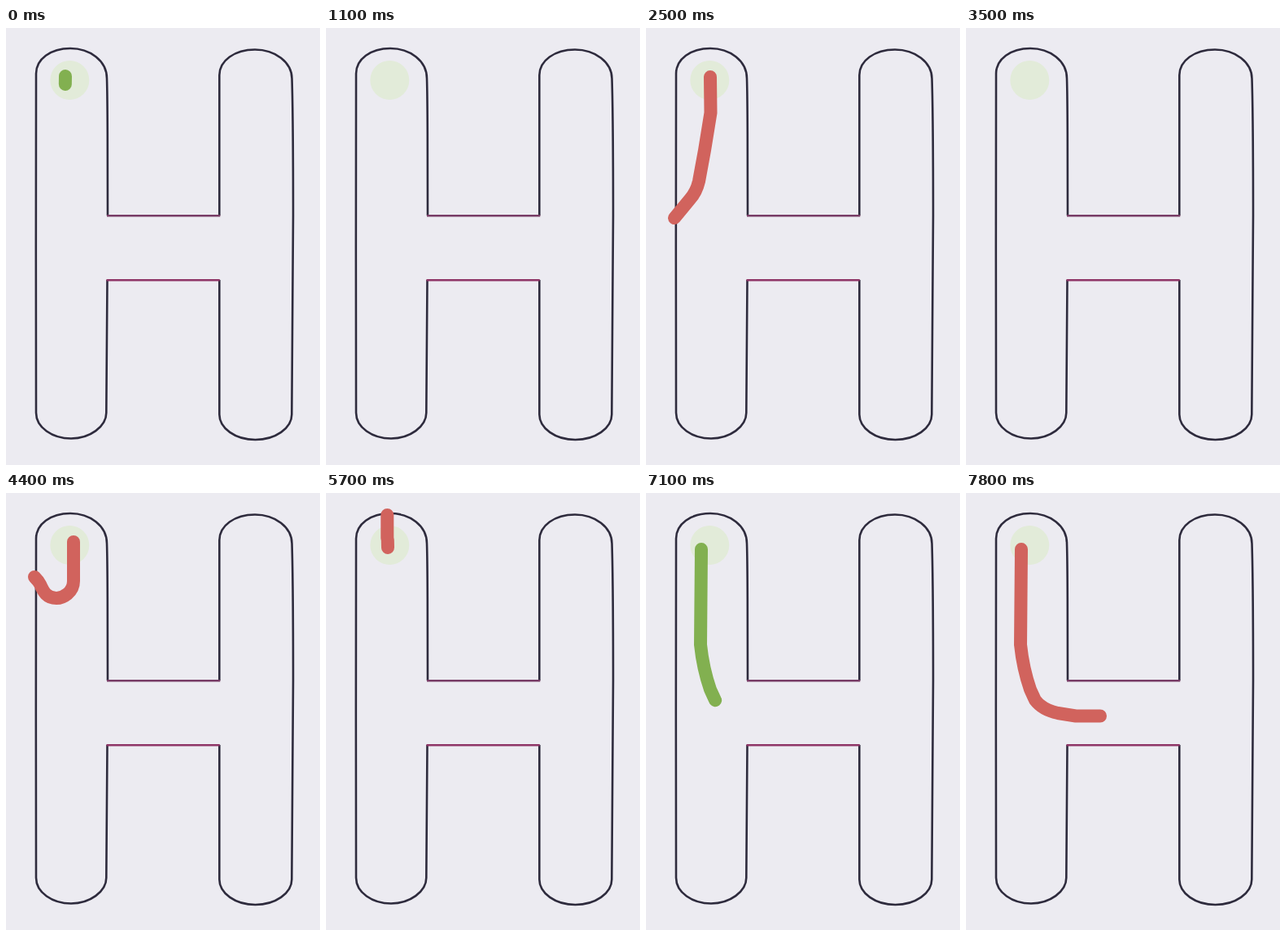
An HTML page for the animation above (7900 ms loop, 386 px wide and 536 px high).

```html
<!DOCTYPE html>
<html lang="en">
<head>
<meta charset="utf-8">
<title>Letter tracing</title>
<style>
  html, body { margin: 0; width: 100%; height: 100%; overflow: hidden; background: #ecebf1; }
  svg { display: block; width: 386px; height: 536px; }
  path { fill: none; }
  .edge { stroke: #2e2b3d; stroke-width: 2.6; stroke-linejoin: round; }
  #trace { stroke-width: 16; stroke-linecap: round; stroke-linejoin: round; }
</style>
</head>
<body>
<svg viewBox="0 0 386 536">
  <circle cx="78.3" cy="64" r="24" fill="#e2ebd9"/>
  <path class="edge" d="M125 230 L124.8 130 Q124.6 80 124 62 C124 40 103 25 79 25 S37 38 37 56 L36.8 270 L37 472 C37 490 57 503.500 80 503.500 S123.300 489 123.300 472 L124.500 309"/>
  <path class="edge" d="M262.300 230 L262.300 58 C262.300 40 281 26.500 306 26.500 S351.300 42 351.500 62 Q353 110 353 230 Q352.800 330 351.300 474 C351.300 491 331 505 306.500 505 S262.300 491 262.300 474 L262.300 309"/>
  <path d="M124 230.200 H263.300" stroke="#783c66" stroke-width="2.5"/>
  <path d="M123.500 309.200 H262.800" stroke="#8f3567" stroke-width="2.5"/>
  <path id="trace"/>
</svg>
<script>
  const LOOP = 7900, STEP = 100;
  const GREEN = '#82b050', RED = '#d1635d';

  // keys: [time, drawn length]; the stroke turns red at `fail` and vanishes at `end`
  const strokes = [
    { d: 'M73 59 L72 120 Q72 165 75 195',
      keys: [[0, 10], [500, 137]], fail: 500, end: 1000 },
    { d: 'M79 60 L79.5 104 L72 150 L65 188 Q62 201 54 210 L35 233',
      keys: [[1700, 4], [2400, 174], [2500, 200]], fail: 2500, end: 3000 },
    { d: 'M83 60 V108 C83 122 70 129 62 129 C50 129 46 121 42 112 Q40 108 35 103',
      keys: [[3600, 2], [4400, 140]], fail: 4400, end: 4900 },
    { d: 'M76 67 L75.8 58 L75.3 55 V27',
      keys: [[5200, 2], [5500, 42]], fail: 5500, end: 6000 },
    { d: 'M68 69 L67 186 Q70 215 79 241 L85 254 Q94 266 113 270 L135 273.5 H165',
      keys: [[6500, 4], [7100, 188], [7400, 290]], fail: 7400, end: LOOP }
  ];

  const trace = document.getElementById('trace');

  function lengthAt(keys, t) {
    for (let i = 1; i < keys.length; i++) {
      const [t0, a] = keys[i - 1], [t1, b] = keys[i];
      if (t <= t1) return a + (b - a) * (t - t0) / (t1 - t0);
    }
    return keys[keys.length - 1][1];
  }

  function draw(now) {
    const t = Math.floor(now % LOOP / STEP) * STEP;
    const s = strokes.find(s => t >= s.keys[0][0] && t < s.end);
    trace.style.display = s ? '' : 'none';
    if (s) {
      trace.setAttribute('d', s.d);
      trace.setAttribute('stroke', t < s.fail ? GREEN : RED);
      trace.setAttribute('stroke-dasharray', lengthAt(s.keys, t) + ' 1000');
    }
  }

  const start = performance.now();
  function tick() {
    draw(performance.now() - start);
    requestAnimationFrame(tick);
  }
  tick();
</script>
</body>
</html>
```
